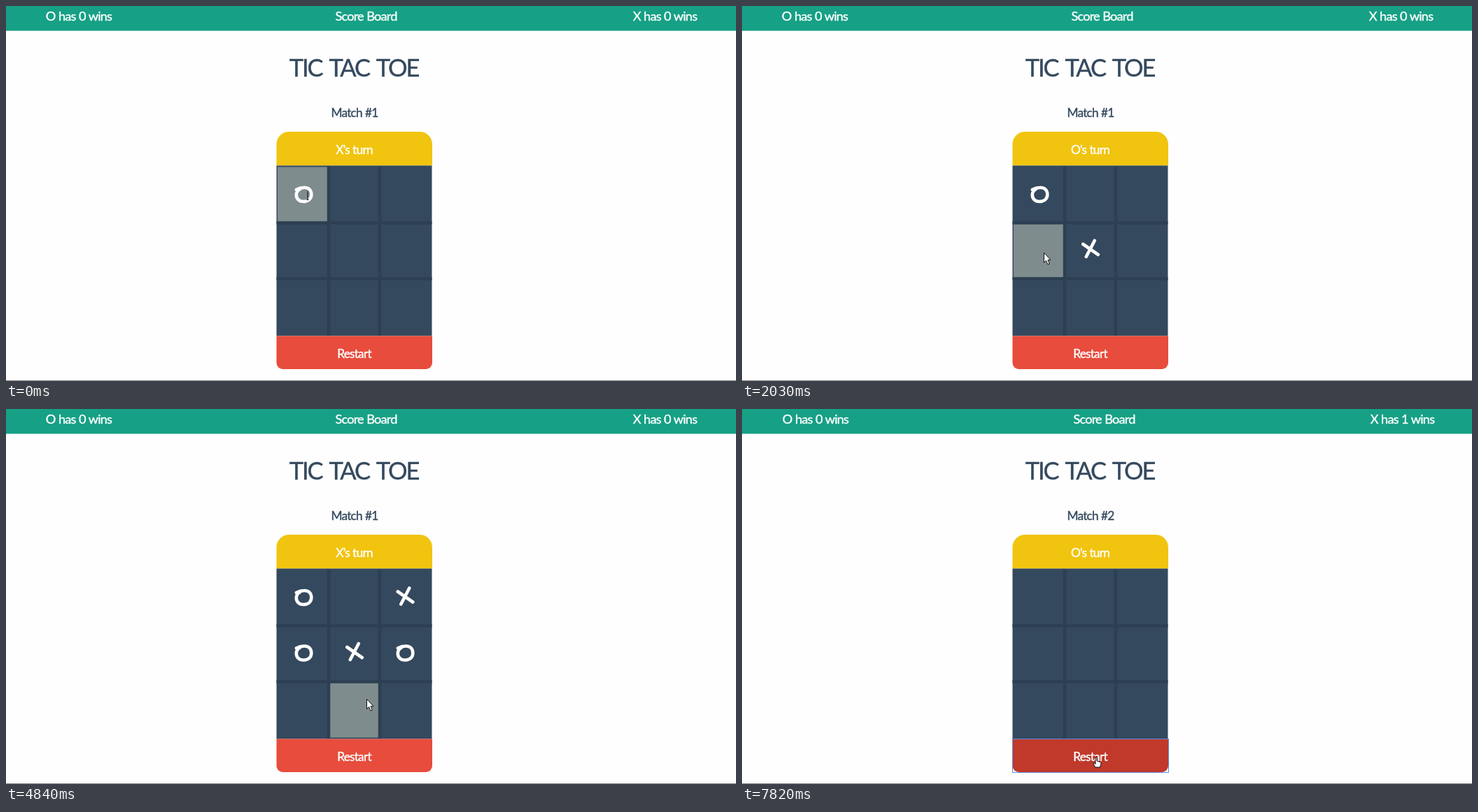
These frames come from a looping animation (1043 by 537 pixels, 8000 ms). An HTML page:

```html
<!DOCTYPE html>
<html lang="en">
<head>
<meta charset="utf-8">
<title>Tic Tac Toe</title>
<style>
  html, body { margin: 0; width: 100%; height: 100%; overflow: hidden; background: #fefefe; }
  svg { display: block; width: 100%; height: 100%; }
  text {
    font: 400 17.3px Lato, "Open Sans", sans-serif;
    letter-spacing: -.045em; word-spacing: .03em; text-anchor: middle;
    fill: #fff; stroke: #fff; stroke-width: .4; stroke-linejoin: round;
  }
  .score { font-size: 18.2px; }
  .dark { fill: #34495e; stroke: #34495e; }
  .title { font-size: 34.5px; letter-spacing: -.06em; word-spacing: .12em; }
  .mark { fill: none; stroke: #fff; stroke-width: 4.6; stroke-linecap: round; stroke-linejoin: round; }
  .pointer { fill: #fff; stroke: #111; stroke-linejoin: round; }
</style>
</head>
<body>
<svg viewBox="0 0 1043 537">
  <defs>
    <path id="O" class="mark" d="M-10.5-6.5Q-5-9.5 1-9.5C8-9.5 11-5 11 0.5C11 7 6 10.5-.5 10.5C-7 10.5-10.5 6-10.5 1C-10.5-3-8-6-5-7.5"/>
    <path id="X" class="mark" d="M6-13L-6 10M-10.5-8L11 7"/>
  </defs>

  <rect width="1043" height="35.5" fill="#16a085"/>
  <text id="scoreO" class="score" y="20.5">O has 0 wins</text>
  <text id="scoreTitle" class="score" y="20.5">Score Board</text>
  <text id="scoreX" class="score" y="20.5"></text>

  <text class="dark title" x="497" y="101"> TIC TAC TOE</text>
  <text id="match" class="dark" x="498" y="158.5"></text>

  <path id="banner" d="M386.5 228.5V198a18 18 0 0 1 18-18H591a18 18 0 0 1 18 18V228.5Z"/>
  <text id="status" x="497.5" y="211.5"></text>

  <rect x="386.5" y="228.5" width="222" height="244" fill="#34495e"/>
  <rect id="hover" width="72.5" height="80" fill="#7f8c8d"/>
  <path d="M461 229V472M534 229V472M386.5 310.5H608.5M386.5 390.5H608.5" stroke="#2d3f52" stroke-width="4.5"/>
  <g id="marks"></g>

  <path id="restart" d="M386.5 472.5H609V511a9 9 0 0 1-9 9H395.500a9 9 0 0 1-9-9Z"/>
  <text x="497.5" y="503.5">Restart</text>
  <rect id="focus" x="386.5" y="472.5" width="223" height="48" fill="none" stroke="#5b8fe0"/>
  <path d="M0 536.5H1043" stroke="#858585"/>

  <g id="cursor">
    <path id="arrow" class="pointer" d="M.5.5V14.5L3.6 11.6L6 17.2L8.3 16.2L6 10.7H10Z"/>
    <path id="beam" d="M0-6V6M-1.5 6.5H1.5" fill="none" stroke="#222" stroke-width="1.2"/>
    <path id="hand" class="pointer" d="M-1 0Q0-1.500 1 0V5L6 6.5Q7 7 7 9L5.5 14H-1.5L-4 9Q-4 7-2.5 8L-1 9.5Z"/>
  </g>
</svg>

<script>
const LOOP = 8000, STEP = LOOP / 60, MOVE = 300;
const FOCUS = 7430, RESET = 7560;

// clicks on the board: O and X in turn, the last one wins
const clicks = [0, 780, 2310, 3770, 4580, 5540];
const WIN = clicks.at(-1);

// arrival time and place of each pointer move
const stops = [
  [0, 431, 271], [230, 455, 335], [500, 503, 349], [1200, 481, 352], [1730, 426, 400],
  [2000, 431, 353], [2660, 520, 414], [2900, 572, 381], [3560, 571, 300], [4270, 581, 348],
  [4800, 515, 415], [5100, 434, 435], [5940, 480, 440], [6430, 506, 499]
];

const $ = id => document.getElementById(id);
const show = (el, on) => el.setAttribute("visibility", on ? "visible" : "hidden");
const set = (id, attrs) => {
  for (const key in attrs) $(id).setAttribute(key, attrs[key]);
};

// the screen was sampled, so the pointer advances in steps
function pointerAt(time) {
  const t = Math.floor(time / STEP) * STEP;
  const next = stops.findIndex(s => s[0] > t);
  if (next < 0) return stops.at(-1).slice(1);
  const [from, x0, y0] = stops[next - 1], [end, x1, y1] = stops[next];
  const start = Math.max(from, end - MOVE);
  const p = Math.max(0, (t - start) / (end - start));
  const ease = p * p * (3 - 2 * p);
  return [x0 + (x1 - x0) * ease, y0 + (y1 - y0) * ease];
}

const cellAt = ([x, y]) => ({
  col: x < 461 ? 0 : x < 534 ? 1 : 2,
  row: y < 310.5 ? 0 : y < 390.5 ? 1 : 2
});
const center = ({ col, row }) => [425.3 + 72.5 * col, 269.5 + 79.5 * row];

const marks = clicks.map((time, i) => {
  const use = document.createElementNS("http://www.w3.org/2000/svg", "use");
  const [x, y] = center(cellAt(pointerAt(time)));
  use.setAttribute("href", i % 2 ? "#X" : "#O");
  use.setAttribute("transform", `translate(${x} ${y})`);
  $("marks").append(use);
  return { use, x, y };
});

function drawBoard(t) {
  const won = t >= WIN, over = t >= RESET, celebrate = won && !over;
  const played = over ? 0 : clicks.filter(time => t >= time).length;
  marks.forEach((m, i) => show(m.use, i < played));

  $("status").textContent = celebrate ? "X Wins !" : (played % 2 ? "X" : "O") + "'s turn";
  set("banner", { fill: celebrate ? "#2ecc71" : "#f1c40f" });
  $("match").textContent = "Match #" + (over ? 2 : 1);
  $("scoreX").textContent = `X has ${won ? 1 : 0} wins`;
  set("scoreO", { x: won ? 105 : 104 });
  set("scoreTitle", { x: won ? 517.5 : 514.5 });
  set("scoreX", { x: won ? 943.5 : 941.5 });
  show($("focus"), t >= FOCUS);
  return marks.slice(0, played);
}

function drawPointer(t, placed) {
  const [x, y] = pointerAt(t), { col, row } = cellAt([x, y]);
  const onButton = y > 472;
  const onMark = placed.some(m => Math.abs(x - m.x) < 14 && Math.abs(y - m.y) < 16);

  set("hover", { x: 388 + 73 * col, y: 230.5 + 80 * row });
  show($("hover"), !onButton);
  set("restart", { fill: onButton ? "#c0392b" : "#e74c3c" });
  set("cursor", { transform: `translate(${Math.round(x)} ${Math.round(y)})` });
  show($("hand"), onButton);
  show($("beam"), onMark);
  show($("arrow"), !onMark && !onButton);
}

function frame() {
  const t = performance.now() % LOOP;
  drawPointer(t, drawBoard(t));
  requestAnimationFrame(frame);
}
frame();
</script>
</body>
</html>
```
